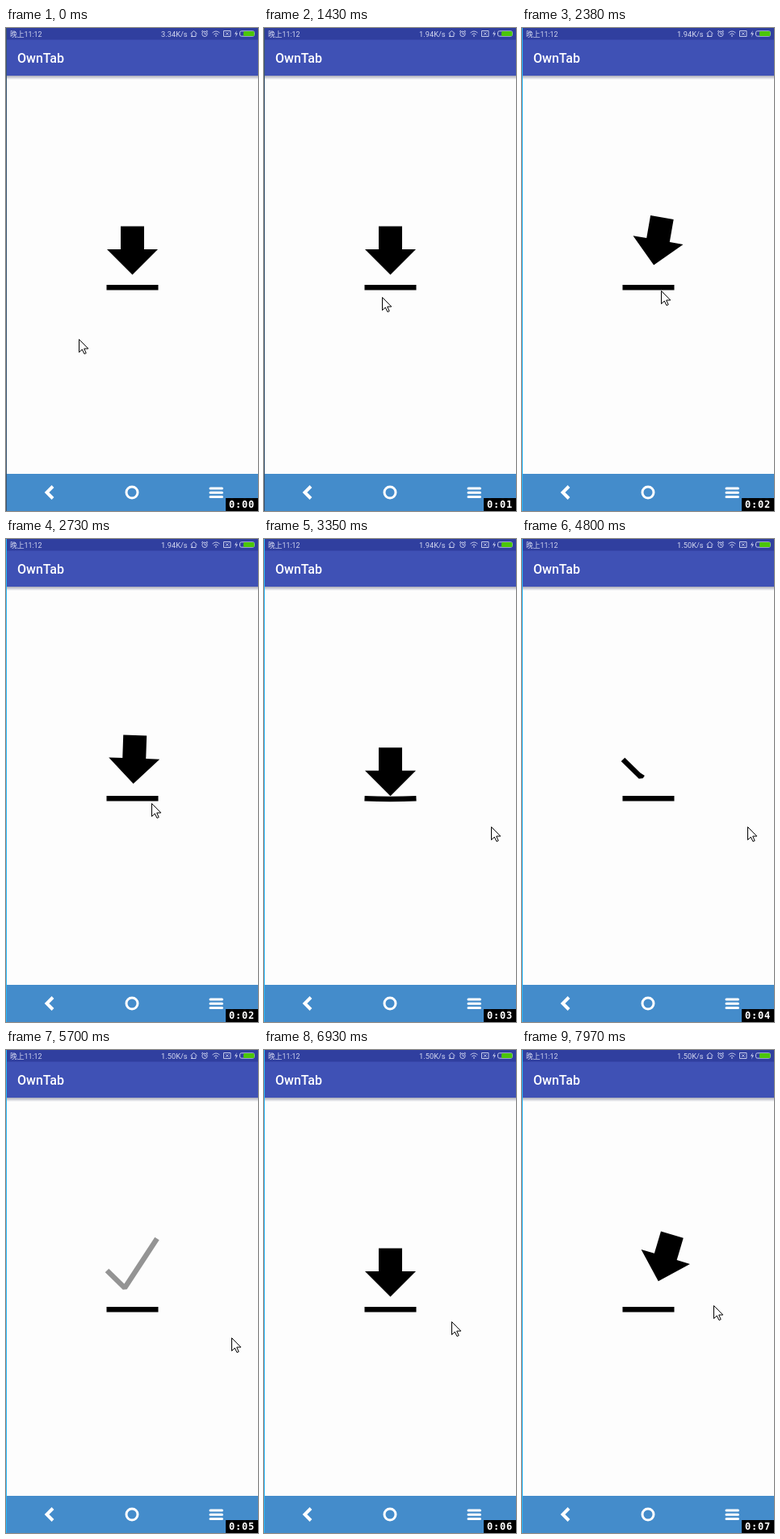
Animation of 312 by 598 pixels, one loop 8000 ms. Source, as an HTML page:

```html
<!DOCTYPE html>
<html lang="en">
<head>
<meta charset="utf-8">
<title>Download icon</title>
<style>
  html, body { margin: 0; width: 100%; height: 100%; overflow: hidden; background: #fdfdfd; }
  svg { display: block; width: 100vw; height: 100vh; }
  text { fill: #fff; font-family: Roboto, "Noto Sans CJK SC", "Noto Sans CJK", sans-serif; }
  .status { fill: #d3d7ef; }
  .title { font-size: 16px; font-weight: 500; }
  .clock { font: bold 12px "DejaVu Sans Mono", monospace; letter-spacing: .8px; }
  .icons { fill: none; stroke: #c3c9ea; stroke-width: 1; }
  .nav { fill: none; stroke: #fff; }
</style>
</head>
<body>
<svg viewBox="0 0 312 598" preserveAspectRatio="none">
  <defs>
    <linearGradient id="shade" x2="0" y2="1">
      <stop stop-color="#a9abb8"/>
      <stop offset="1" stop-color="#fdfdfd"/>
    </linearGradient>
  </defs>
  <rect width="312" height="598" fill="#fdfdfd"/>
  <rect y="59" width="312" height="5" fill="url(#shade)"/>
  <rect width="312" height="15" fill="#303f9f"/>
  <rect y="14.5" width="312" height="44.5" fill="#3f51b5"/>
  <rect y="552" width="312" height="46" fill="#448ccb"/>

  <text class="status" x="5" y="10.5" font-size="8.8">晚上11:12</text>
  <text class="status" id="speed" x="192" y="10.5" font-size="9.3"></text>
  <g class="icons">
    <path d="M228.5 7 232.5 3.5 236.5 7M230 6.5V10.5H235V6.5M229 11 231 9"/>
    <circle cx="246" cy="7.3" r="3.2"/>
    <path d="M246 5.3V7.5H247.8M242 4.5 244 3M248 3 250 4.5"/>
    <path d="M255.5 6Q260 2 264.5 6M257.3 8Q260 5.6 262.7 8"/>
    <circle cx="260" cy="9.8" r=".6"/>
    <path d="M269.5 3.5H278V10.5H269.5ZM272 5.3 275.5 8.8M275.5 5.3 272 8.8"/>
    <path d="M286 3 283 7.5H285.2L284 11.5 287 6.6H284.8Z" fill="#d3d7ef" stroke="none"/>
    <rect x="289.5" y="3.8" width="18" height="6.4" rx="2"/>
    <rect x="294" y="4" width="13.5" height="6" rx="1.5" fill="#4bc60a" stroke="none"/>
  </g>
  <text class="title" x="14" y="43">OwnTab</text>

  <g class="nav">
    <path d="M58 567.5 50.5 575 58 582.5" stroke-width="4"/>
    <circle cx="156" cy="575" r="7" stroke-width="3"/>
    <path d="M253 570H267.5M253 575.2H267.5M253 580.5H267.5" stroke-width="3" stroke-linecap="round"/>
  </g>

  <rect id="edge" width="1" height="598"/>
  <path id="base" fill="none" stroke="#000" stroke-width="6.5"/>
  <path id="arrow" d="M142 245.5H171V274H188L156.5 305.5 125 274H142Z"/>
  <path id="check" d="M125 273 147 294.5 187 233.5" pathLength="1" stroke-dasharray="1 2"
        fill="none" stroke="#000" stroke-width="6.5" stroke-linejoin="bevel"/>

  <rect x="272" y="582" width="40" height="16"/>
  <text class="clock" id="clock" x="276" y="594"></text>
  <path id="pointer" d="M.5.5V16.5L4.3 13 7 18.5 9.2 17.5 6.7 12H11.8Z" fill="#fff" stroke="#000"/>
</svg>
<script>
const LOOP = 8000, REPLAY = 7600, REPLAY_SHIFT = 5385;
const part = Object.fromEntries(
  [...document.querySelectorAll('[id]')].map(el => [el.id, el]));

const linear = p => p;
const inOut = p => (1 - Math.cos(Math.PI * p)) / 2;
const fall = p => p * p;

// Steps are [time, value]; values hold before the first and after the last.
function track(t, steps, ease = inOut) {
  const i = steps.findIndex(([time]) => time > t);
  if (i === 0) return steps[0][1];
  if (i < 0) return steps[steps.length - 1][1];
  const [t0, a] = steps[i - 1], [t1, b] = steps[i];
  return a + (b - a) * ease((t - t0) / (t1 - t0));
}

const tilt = [[2290, 0], [2485, 22], [2790, 0]];
const drop = [[2850, 0], [3330, 12]];
const rise = [[3700, 0], [3950, -12]];
const sag = [[3310, 0], [3520, 8], [3710, 0]];
const arrowFade = [[4140, 1], [4500, 0], [5900, 0], [6860, 1]];
const checkDraw = [[4480, 0], [5440, 1]];
const checkFade = [[5450, 1], [5880, 0]];
const pointerX = [[0, 90], [119, 90], [120, 91], [960, 91], [1720, 172], [2620, 172],
  [3250, 281], [3470, 281], [3600, 279], [6150, 279], [6700, 232], [7350, 232], [7650, 237]];
const pointerY = [[960, 385], [1600, 323], [1720, 325], [2620, 325],
  [3250, 356], [6150, 356], [6700, 336], [7350, 336], [7650, 316]];

function draw(t) {
  const u = t < REPLAY ? t : t - REPLAY_SHIFT;
  const bend = track(u, sag);
  const dy = track(u, drop, fall) + track(u, rise) + bend;
  part.arrow.setAttribute('transform', `translate(0 ${dy}) rotate(${track(u, tilt)} 229 338)`);
  part.arrow.setAttribute('opacity', track(u, arrowFade, linear));
  part.base.setAttribute('d', `M124.5 321.2Q156.5 ${321.2 + 2 * bend} 188.5 321.2`);

  const drawn = track(u, checkDraw, linear);
  part.check.setAttribute('stroke-dashoffset', 1 - drawn);
  part.check.setAttribute('opacity', drawn > 0 ? track(u, checkFade, linear) : 0);

  const x = Math.round(track(t, pointerX)), y = Math.round(track(t, pointerY));
  part.pointer.setAttribute('transform', `translate(${x} ${y})`);
  part.edge.setAttribute('fill', t < 2150 ? '#36536f' : '#29b6f6');
  part.speed.textContent = (t < 420 ? '3.34' : t < 4600 ? '1.94' : '1.50') + 'K/s';
  part.clock.textContent = '0:0' + Math.floor((t + 10) / 1000);
}

const start = performance.now();
function tick() {
  draw((performance.now() - start) % LOOP);
  requestAnimationFrame(tick);
}
tick();
</script>
</body>
</html>
```
